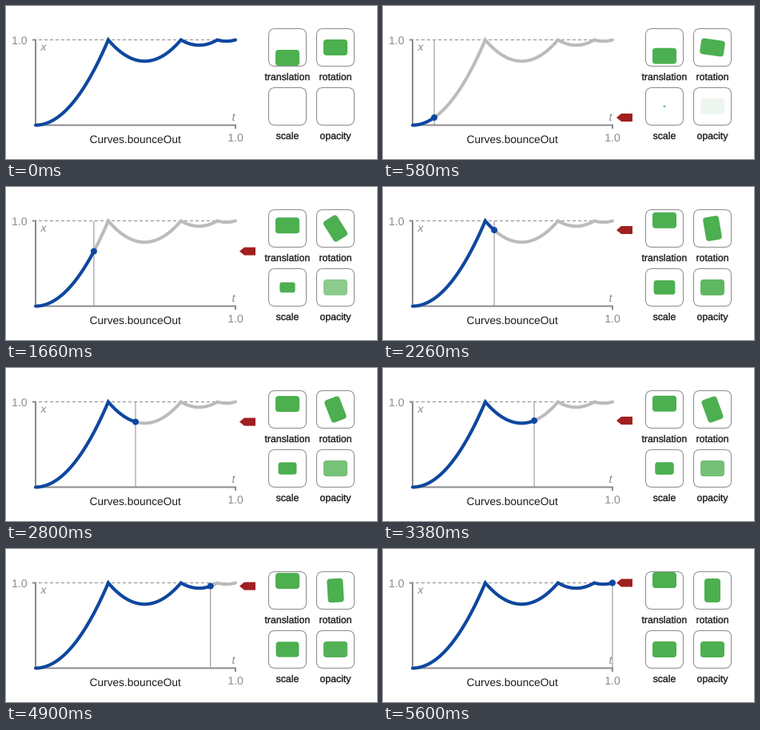
Recreate the animation shown at these times as a matplotlib script. Size 464 px wide and 192 px high, loop 5.62 s.

```python
import numpy as np
import matplotlib.pyplot as plt
from matplotlib.animation import FuncAnimation
from matplotlib.patches import Circle, FancyBboxPatch, Polygon
from matplotlib.patheffects import Stroke
from matplotlib.transforms import Affine2D

W, H, DPI = 464, 192, 64
PT = 72 / DPI  # points per pixel
TICK, TICKS, STEPS = 20, 281, 120

BLUE, GREY, AXIS = "#0d47a1", "#bbbbbb", "#8c8c8c"
GREEN, RED, INK = "#4caf50", "#a02020", "#1c1c1c"
LEFT, RIGHT, TOP, BOTTOM = 37, 287, 42.5, 149.5

plt.rcParams["path.simplify"] = False
plt.rcParams["font.family"] = "Liberation Sans"

fig = plt.figure(figsize=(W / DPI, H / DPI), dpi=DPI, facecolor="white")
ax = fig.add_axes([0, 0, 1, 1])
ax.set_xlim(0, W)
ax.set_ylim(H, 0)
ax.axis("off")


def bounce_out(t):
    """Piecewise parabolas with shrinking rebounds."""
    t = np.asarray(t, float)
    k = 7.5625
    return np.select(
        [t < 1 / 2.75, t < 2 / 2.75, t < 2.5 / 2.75],
        [k * t**2,
         k * (t - 1.5 / 2.75)**2 + 0.75,
         k * (t - 2.25 / 2.75)**2 + 0.9375],
        k * (t - 2.625 / 2.75)**2 + 0.984375)


def to_stage(t):
    return LEFT + (RIGHT - LEFT) * t, BOTTOM - (BOTTOM - TOP) * bounce_out(t)


def line(xs, ys, color, width, z, **kw):
    return ax.plot(xs, ys, color=color, lw=width * PT, zorder=z, snap=False,
                   solid_joinstyle="miter", **kw)[0]


def label(x, y, s, size, color, ha="center", bold=0, **kw):
    ax.text(x, y, s, fontsize=size * PT, color=color, ha=ha, va="baseline",
            path_effects=[Stroke(linewidth=bold, foreground=color)], **kw)


def round_rect(cx, cy, w, h, r, **kw):
    box = FancyBboxPatch((cx - w / 2, cy - h / 2), w, h, snap=False,
                         boxstyle=f"round,pad=0,rounding_size={r}", **kw)
    return ax.add_patch(box)


def tile(cx, cy, name):
    """Framed cell with a green card, drawn around the origin."""
    round_rect(cx, cy, 47, 47, 8, fc="none", ec=AXIS, lw=PT, zorder=5)
    label(cx, cy + 41, name, 12.3, INK, bold=0.4)
    return round_rect(0, 0, 30, 20, 4, fc=GREEN, ec="none", zorder=6)


def place(card, cx, cy, angle=0, scale=1):
    move = Affine2D().scale(scale).rotate_deg(angle).translate(cx, cy)
    card.set_transform(move + ax.transData)


# Chart
line([33, LEFT, LEFT, RIGHT, RIGHT], [TOP, TOP, BOTTOM, BOTTOM, BOTTOM + 4.5],
     AXIS, 2, 1, solid_capstyle="butt")
line([LEFT + 4, RIGHT], [TOP, TOP], AXIS, 1, 1, linestyle=(0, (4, 3)))
label(26.5, 48, "1.0", 14, AXIS, ha="right")
label(RIGHT, 170, "1.0", 14, AXIS)
label(47, 56, "x", 14, AXIS, style="italic")
label(284.5, 144, "t", 14, AXIS, style="italic")
label(162, 172, "Curves.bounceOut", 13.7, INK)

grid = np.linspace(0, 1, 551)
line(*to_stage(grid), GREY, 4, 3, solid_capstyle="round")
trace = line([], [], BLUE, 4, 4, solid_capstyle="round")
guide = line([], [], AXIS, 1, 2, solid_capstyle="butt")
dot = ax.add_patch(Circle((0, 0), 4, fc=BLUE, ec="none", zorder=5))
arrow = ax.add_patch(Polygon([(0, 0)] * 3, fc=RED, ec="none", zorder=5, snap=False))
ARROW = np.array([(292, 0), (298, -5), (312, -5), (312, 5), (298, 5)])

# Cells
slide = tile(352, 52, "translation")
spin = tile(412, 52, "rotation")
grow = tile(352, 126, "scale")
fade = tile(412, 126, "opacity")
place(fade, 412, 126)


def step_at(n):
    """Each group of three steps is held for 5, 1 and 1 ticks."""
    if n == 0:
        return 0
    group, r = divmod(n - 1, 7)
    return 3 * group + 1 + max(0, r - 4)


def draw(n):
    t = step_at(n) / STEPS
    v = float(bounce_out(t))
    x, y = (float(c) for c in to_stage(t))
    running = t > 0

    # At rest the whole curve is active.
    trace.set_data(*to_stage(np.append(grid[grid < t - 1e-6], t) if running else grid))
    guide.set_data([x, x], [TOP, BOTTOM])
    dot.center = x, y
    arrow.set_xy(ARROW + (0, y))
    for part in (guide, dot, arrow, grow):
        part.set_visible(running)

    place(slide, 352, 65 - 26 * v)
    place(spin, 412, 52, angle=90 * v)
    place(grow, 352, 126, scale=max(v, 1e-4))
    fade.set_alpha(v)
    return trace, guide, dot, arrow, slide, spin, grow, fade


anim = FuncAnimation(fig, draw, frames=TICKS, interval=TICK,
                     repeat=True, repeat_delay=0, blit=False)
plt.show()
```
